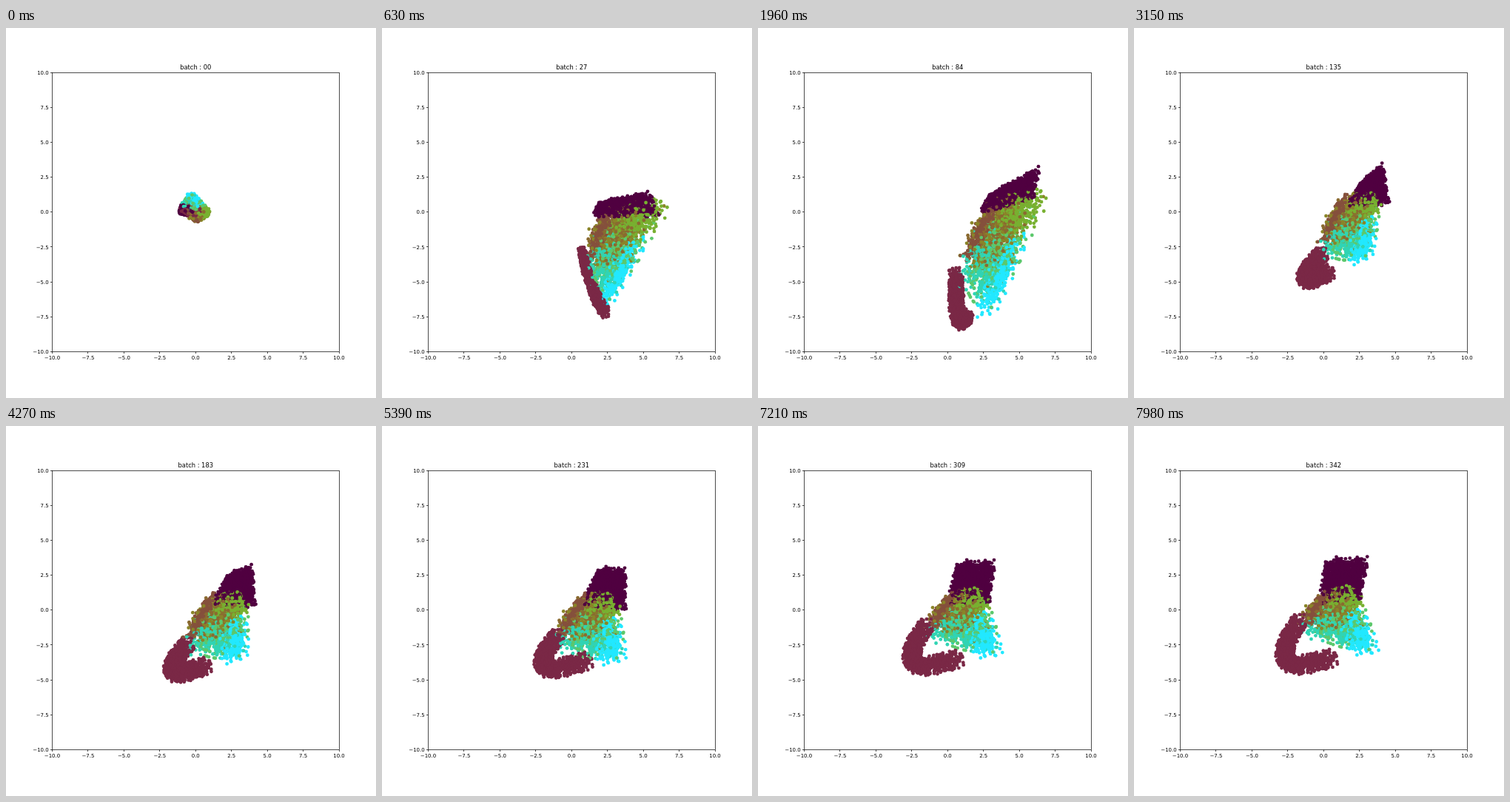
Recreate the animation shown at these times as an HTML page with a canvas. Size 500x500 px, loop 8000 ms.

```html
<!DOCTYPE html>
<html lang="en">
<head>
<meta charset="utf-8">
<title>Scatter training</title>
<style>
  html, body { margin: 0; width: 100%; height: 100%; overflow: hidden; background: #fff; }
  canvas { display: block; width: 500px; height: 500px; }
</style>
</head>
<body>
<canvas id="plot" width="500" height="500"></canvas>
<script>
const ctx = document.getElementById('plot').getContext('2d');
const LOOP = 8000, STEP = 70;
const LEFT = 62.5, RIGHT = 450.5, TOP = 60.5, BOTTOM = 437.5;
const toX = x => 256.25 + x * 19.375;
const toY = y => 248.75 - y * 18.875;

// Steps at which the shapes below are given, in data units.
const keySteps = [0, 16, 28, 45, 77, 114];

// Four corners: inner left, outer left, outer right, inner right.
const headQuad = [
  [-1.1, -.1, -1, .5, -.2, .5, -.1, -.3],
  [3, -.4, 3.2, .8, 7.6, 1.7, 8.2, -.2],
  [2.5, 0, 3, 1.3, 6.3, 3.1, 5.8, 1],
  [1.8, .5, 2.6, 2.1, 4.1, 3.3, 4.4, .7],
  [.9, .5, 1.9, 2.9, 3.7, 2.8, 3.6, .1],
  [-.1, .6, .2, 3.5, 3, 3.6, 2.4, .8]
];
// Four corners: bottom left, top left, top right, bottom right.
const coreQuad = [
  [-1, .4, 0, -.6, .8, 0, -.2, 1.2],
  [1.6, -6, 3.2, 0, 8, 0, 4, -9],
  [.6, -4.4, 3, .5, 6.2, .6, 3.2, -6.6],
  [-.5, -3, 1.2, .8, 3.5, .8, 3, -3],
  [-1.4, -2.6, .6, .8, 2.8, .6, 3.2, -3.3],
  [-1.7, -1.6, -.2, 1, 2, 1.2, 3.2, -2.7]
];
// Quadratic curve (three points), then the half width at both ends.
const tailCurve = [
  [-.9, .2, -.3, -.4, .3, .2, .2, .2],
  [1.4, -3.8, 1.7, -7, 3.1, -10.2, .3, .5],
  [.6, -4.2, .5, -9.2, 1.3, -7.4, .5, .55],
  [-.1, -2.9, -2.6, -5.9, .3, -4.3, .6, .65],
  [-.9, -1.7, -3.8, -5.4, 1, -3.6, .6, .7],
  [-1.6, -.6, -4.6, -5.2, .5, -3.4, .6, .7]
];

// Classes inside the core: colour, position and reach along and across it.
const coreClasses = [
  ['#85503c', .66, .07, .36, .14],
  ['#8a6a30', .68, .38, .34, .42],
  ['#8a8428', .6, .48, .42, .5],
  ['#78b030', .87, .68, .24, .4],
  ['#5cc86c', .4, .6, .42, .46],
  ['#30d4b4', .3, .5, .36, .46],
  ['#22e8ff', .27, .88, .36, .22]
];

let seed = 20;
function random() {
  seed = (Math.imul(seed, 1664525) + 1013904223) >>> 0;
  return seed / 4294967296;
}
const bell = () => random() + random() + random() - 1.5;
const mix = (a, b, k) => a + (b - a) * k;

function onQuad(q, s, t) {
  return [0, 1].map(i => mix(mix(q[i], q[2 + i], s), mix(q[6 + i], q[4 + i], s), t));
}
function onCurve(c, s, dx, dy) {
  const width = mix(c[6], c[7], s);
  const along = i => mix(mix(c[i], c[2 + i], s), mix(c[2 + i], c[4 + i], s), s);
  return [along(0) + dx * width, along(1) + dy * width];
}

const points = [];
function add(count, color, make) {
  for (let i = 0; i < count; i++) points.push({ color, order: random(), place: make() });
}
add(1000, '#500040', () => {
  const s = random() + bell() * .12, t = random() + bell() * .1;
  return shape => onQuad(shape.head, s, t);
});
add(1150, '#7a2846', () => {
  const s = random(), angle = random() * 2 * Math.PI, r = Math.sqrt(random()) + bell() * .15;
  const dx = Math.cos(angle) * r, dy = Math.sin(angle) * r;
  return shape => onCurve(shape.tail, s, dx, dy);
});
for (const [color, s0, t0, ds, dt] of coreClasses) {
  add(350, color, () => {
    const s = s0 + bell() * ds, t = t0 + bell() * dt;
    return shape => onQuad(shape.core, s, t);
  });
}
points.sort((a, b) => a.order - b.order);

function shapeAt(step) {
  let i = 0;
  while (i < keySteps.length - 2 && step >= keySteps[i + 1]) i++;
  let k = (step - keySteps[i]) / (keySteps[i + 1] - keySteps[i]);
  if (i === 0) k = 1 - (1 - k) ** 1.5;
  const blend = keys => keys[i].map((v, n) => mix(v, keys[i + 1][n], k));
  return { head: blend(headQuad), core: blend(coreQuad), tail: blend(tailCurve) };
}

function line(x1, y1, x2, y2) {
  ctx.beginPath();
  ctx.moveTo(x1, y1);
  ctx.lineTo(x2, y2);
  ctx.stroke();
}

function drawAxes() {
  ctx.strokeStyle = ctx.fillStyle = '#000';
  ctx.lineWidth = .7;
  ctx.strokeRect(LEFT, TOP, RIGHT - LEFT, BOTTOM - TOP);
  ctx.font = '6.944px "DejaVu Sans", sans-serif';
  for (let v = -10; v <= 10; v += 2.5) {
    const label = v.toFixed(1).replace('-', '\u2212');
    const x = Math.floor(toX(v)) + .5, y = Math.floor(toY(v)) + .5;
    line(x, BOTTOM, x, BOTTOM + 2.5);
    line(LEFT, y, LEFT - 2.5, y);
    ctx.textAlign = 'center';
    ctx.fillText(label, toX(v), 447.5);
    ctx.textAlign = 'right';
    ctx.fillText(label, 57.6, toY(v) + 2.6);
  }
}

function draw(step) {
  ctx.fillStyle = '#fff';
  ctx.fillRect(0, 0, 500, 500);

  ctx.save();
  ctx.beginPath();
  ctx.rect(LEFT, TOP, RIGHT - LEFT, BOTTOM - TOP);
  ctx.clip();
  const shape = shapeAt(step);
  for (const { color, place } of points) {
    const [x, y] = place(shape);
    ctx.fillStyle = color;
    ctx.beginPath();
    ctx.arc(toX(x), toY(y), 2.4, 0, 2 * Math.PI);
    ctx.fill();
  }
  ctx.restore();

  drawAxes();
  ctx.textAlign = 'center';
  ctx.font = '8.333px "DejaVu Sans", sans-serif';
  ctx.fillText('batch : ' + String(step * 3).padStart(2, '0'), 256.25, 55.6);
}

let shown = -1;
const start = performance.now();
function tick() {
  const step = Math.floor((performance.now() - start) % LOOP / STEP);
  if (step !== shown) draw(shown = step);
  requestAnimationFrame(tick);
}
tick();
</script>
</body>
</html>
```
